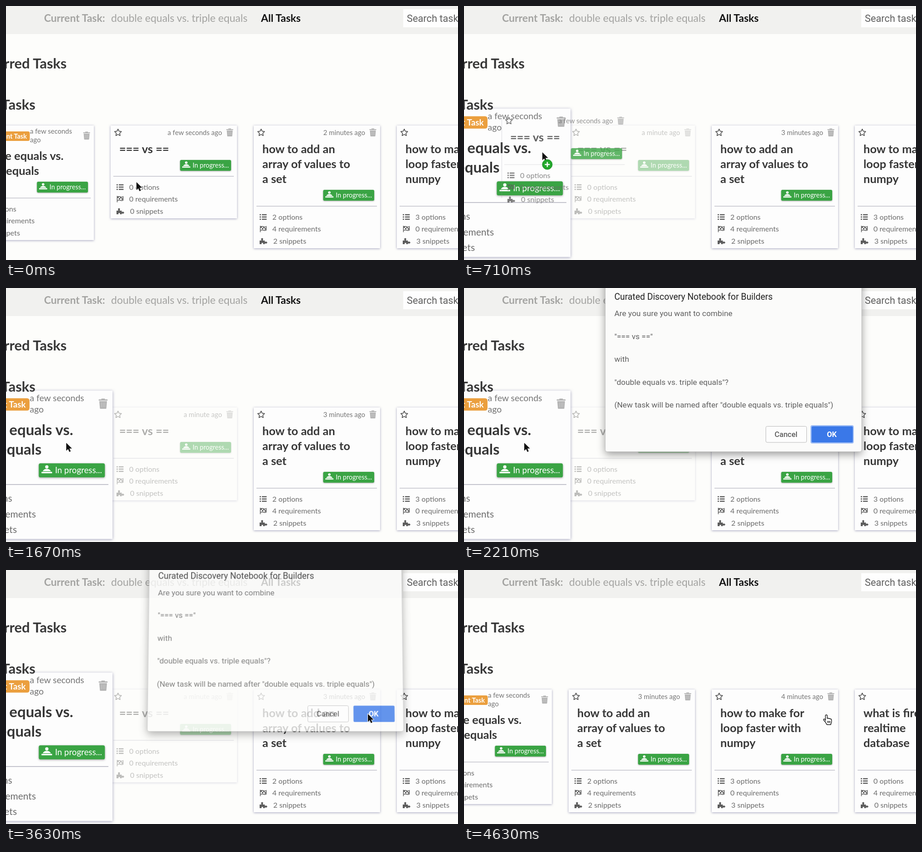
Recreate the animation shown at these times as an HTML page. Size 998 by 561 pixels, loop 4670 ms.

```html
<!DOCTYPE html>
<html lang="en">
<head>
<meta charset="utf-8">
<title>Combining tasks</title>
<style>
html, body { margin: 0; width: 100%; height: 100%; overflow: hidden; background: #fdfdfb; }
#stage { position: absolute; inset: 0; overflow: clip; contain: strict; }
svg { position: absolute; left: 0; top: 0; width: 998px; height: 561px; overflow: hidden; font-family: Lato, sans-serif; }
text { white-space: pre; }
.end { text-anchor: end; }
.mid { text-anchor: middle; }
.nav { font-size: 23px; fill: #a3a3a1; }
.bold { font-weight: 700; }
.head { font-size: 31px; font-weight: 700; fill: #373737; }
.title { font-size: 25.5px; font-weight: 700; fill: #363636; }
.date { font-size: 15px; fill: #757575; }
.row { font-size: 16.2px; fill: #6c6c6c; }
.tag { font-size: 14.5px; fill: #fff; }
.paper { fill: #fdfdfd; filter: drop-shadow(0 1.5px 2.5px rgba(70, 70, 125, .5)); }
.badge { fill: #3aa444; filter: drop-shadow(0 1px 1.5px rgba(0, 0, 0, .35)); }
.icon { fill: #5c5c5c; }
.line { fill: none; stroke: #5c5c5c; }

/* one clock for every part */
.anim { animation: 4670ms step-end infinite both; }
.before { animation-name: before; }
.after { animation-name: after; }
.old { animation-name: old; }
.new { animation-name: new; }
.source { animation-name: source; }
.ghost { animation-name: ghost; }
.plus { animation-name: plus; }
.arrow { animation-name: arrow; }
.hand { animation-name: hand; }
.grow { animation-name: grow; animation-timing-function: ease-out; transform-origin: 139.5px 126.5px; }
.mover { animation-name: move; animation-timing-function: linear; }
#dialog { animation-name: dialog; animation-timing-function: linear; transform-origin: 595px 361px; font-family: Roboto, sans-serif; }
.ring { animation-name: ring; }

@keyframes before { 0% { opacity: 1 } 6.42%, to { opacity: 0 } }
@keyframes after { 0% { opacity: 0 } 6.42%, to { opacity: 1 } }
@keyframes old { 0% { opacity: 1 } 82.4%, to { opacity: 0 } }
@keyframes new { 0% { opacity: 0 } 82.4%, to { opacity: 1 } }
@keyframes source { 0% { opacity: 1 } 6.42% { opacity: .4 } 82.4%, to { opacity: 0 } }
@keyframes ghost { 0% { opacity: 0 } 6.42% { opacity: .8 } 35.1%, to { opacity: 0 } }
@keyframes plus { 0% { opacity: 0 } 12.4% { opacity: 1 } 35.1%, to { opacity: 0 } }
@keyframes arrow { 0% { opacity: 1 } 83.5%, to { opacity: 0 } }
@keyframes hand { 0% { opacity: 0 } 83.5%, to { opacity: 1 } }
@keyframes ring { 0% { opacity: 1 } 76.4%, to { opacity: 0 } }
@keyframes grow {
  0%, 12.2% { transform: scale(1) }
  14.8%, 78.2% { transform: scale(1.295) }
  81.2%, to { transform: scale(1) }
}
@keyframes move {
  0% { transform: translate(287px, 388px); animation-timing-function: ease-in-out }
  5.4% { transform: translate(320px, 348px) }
  6.42% { transform: translate(320px, 348px); animation-timing-function: ease-in }
  12.2% { transform: translate(196px, 325px); animation-timing-function: ease-out }
  15.2% { transform: translate(172px, 322px) }
  24.2% { transform: translate(140px, 337px); animation-timing-function: ease-out }
  28%, 49% { transform: translate(132px, 341px); animation-timing-function: ease-in-out }
  64.2%, to { transform: translate(798px, 317px) }
}
@keyframes dialog {
  0%, 36.6% { opacity: 0; transform: translateY(-15px) perspective(2000px) rotateX(15deg) scaleY(1.06) }
  39.8%, 76.4% { opacity: 1; transform: translateY(0) perspective(2000px) rotateX(0deg) scaleY(1) }
  77.73% { opacity: .8; transform: translateY(-5px) perspective(2000px) rotateX(5deg) scaleY(1.02) }
  80.7%, to { opacity: 0; transform: translateY(-15px) perspective(2000px) rotateX(15deg) scaleY(1.06) }
}
</style>
</head>
<body>
<div id="stage">
  <svg id="page" viewBox="0 0 998 561"></svg>
  <svg id="dialog" class="anim" viewBox="0 0 998 561"></svg>
  <svg id="top" viewBox="0 0 998 561"></svg>
</div>
<script>
const text = (x, y, s, cls) => `<text x="${x}" y="${y}" class="${cls}">${s}</text>`;
const group = (x, y, body, cls = '') =>
  `<g transform="translate(${x} ${y})"><g class="${cls}">${body}</g></g>`;
const rect = (x, y, w, h, more) => `<rect x="${x}" y="${y}" width="${w}" height="${h}" ${more}/>`;

const starPoints = Array.from({ length: 10 }, (_, i) => {
  const r = i % 2 ? 3.9 : 8, a = i * Math.PI / 5;
  return `${(r * Math.sin(a)).toFixed(1)},${(-r * Math.cos(a)).toFixed(1)}`;
}).join(' ');
const star = group(16.3, 15.8,
  `<polygon points="${starPoints}" fill="none" stroke="#444" stroke-width="1.5" stroke-linejoin="round"/>`);

const trash = y => group(263, y, `
  <path fill="#b3b3b3" d="M-7.5-7h15v2h-15zM-3-8.500h6v2h-6zM-6.500-4h13l-1 12q0 1-1 1h-9q-1 0-1-1z"/>
  <path fill="none" stroke="#ccc" d="M-3-2v8.500M0-2v8.500M3-2v8.500"/>`);

const icons = [
  '<path class="line" stroke-width="2.3" d="M0-5h3M5-5h10.500M0 0h3M5 0h10.500M0 5h3M5 5h10.500"/>',
  `<path class="line" stroke-width="1.5" d="M1.500-7v14M2-5q3.500-1.500 6.500 0t6-.5v8q-3 1.500-6 .3t-6.500 .3"/>
   <path class="icon" d="M2-5l3-.7v3l-3 .5zM8-5l3 .5v3l-3-.5zM5-2.500l3 .5v3l-3-.5zM11-1.500l3-.5v3l-3 .5z"/>`,
  `<path class="icon" d="M0-1h4q-2-5 1.500-5.500q3.500 .5 1.500 5.500h4.500v3q4-2 5.500 1.500q-1.500 3.500-5.500 1.500v2h-4
   q1-3-1.500-3t-1.500 3h-4.500z"/>`
];

const badge = y => group(153, y, rect(.3, 0, 112.7, 24, 'rx="3" class="badge"') + `
  <g fill="#fff"><circle cx="14" cy="6" r="2.8"/>
  <path d="M7 13.500q2-4 7-4t7 4zM5 14.500h18v2.500h-18z"/></g>` +
  text(28, 17, 'In progress...', 'tag'));

const date = (s, cls = '') => text(246, 21, s, `date end ${cls}`);
const dates = (a, b) => date(a, 'anim before') + date(b, 'anim after');

const currentTop =
  rect(40, 13, 97.5, 21, 'rx="4" fill="#eb9f3e"') +
  text(131, 28.5, 'Current Task', 'tag bold end') +
  text(138, 18, 'a few seconds', 'date') + text(138, 37, 'ago', 'date') + trash(22);

function card(x, title, counts, top, { cls = '', first = 61, bare = false } = {}) {
  const b = first + (title.length - 1) * 33 + 15;
  const names = ['options', 'requirements', 'snippets'];
  const back = bare
    ? `<path d="M.5 10v${b + 100}" stroke="#889" opacity=".35"/>`
    : rect(0, 0, 279, b + 129, 'class="paper"');
  const rows = counts.map((n, i) => {
    const y = b + 60 + i * 26.5;
    return group(13, y, icons[i]) + text(i < 2 ? 41 : 43, y + 5.7, `${n} ${names[i]}`, 'row');
  }).join('');
  return group(x, 264, back + top +
    title.map((s, i) => text(19, first + i * 33, s, 'title')).join('') +
    badge(b) + rect(6, b + 35.5, 266, 1.3, `fill="#b9b9c4" opacity="${bare ? .4 : 1}"`) + rows, cls);
}

const plain = d => star + d + trash(15);
const addArray = ['how to add an', 'array of values to', 'a set'];
const fastLoop = ['how to make for', 'loop faster with', 'numpy'];
const compare = ['=== vs =='];
const hidden = { cls: 'anim old' }, shown = { cls: 'anim new' };

document.getElementById('page').innerHTML =
  rect(0, 0, 998, 62, 'fill="#f1f1ef"') +
  text(84, 34.5, 'Current Task:', 'nav bold') +
  text(232, 34.5, 'double equals vs. triple equals', 'nav') +
  '<text x="563" y="34.5" class="bold" font-size="23" fill="#111">All Tasks</text>' +
  rect(877, 7, 121, 40, 'fill="#fefefe"') +
  '<text x="885" y="34.5" font-size="21.8" fill="#606060" font-family="Roboto, sans-serif">Search task</text>' +
  card(231, compare, [0, 0, 0], plain(dates('a few seconds ago', 'a minute ago')), { cls: 'anim source' }) +
  card(547, addArray, [2, 4, 2], plain(dates('2 minutes ago', '3 minutes ago')), hidden) +
  card(863, fastLoop, [3, 0, 3], plain(''), hidden) +
  card(231, addArray, [2, 4, 2], plain(date('3 minutes ago')), shown) +
  card(547, fastLoop, [3, 0, 3], plain(date('4 minutes ago')), shown) +
  card(863, ['what is fire', 'realtime', 'database'], [0, 4, 0], plain(''), shown) +
  card(-85, ['double equals vs.', 'triple equals'], [0, 0, 0], currentTop, { cls: 'anim grow', first: 76 }) +
  text(134, 138, 'Starred Tasks', 'head end') +
  text(65, 229, 'Tasks', 'head end');

const message = ['Are you sure you want to combine', '"=== vs =="', 'with',
  '"double equals vs. triple equals"?', '(New task will be named after "double equals vs. triple equals")'];

document.getElementById('dialog').innerHTML =
  rect(312, -40, 566, 401.5, `rx="4" fill="#fbfbfa" stroke="#bbb" stroke-width=".8"
    style="filter:drop-shadow(0 6px 9px rgba(0,0,0,.38))"`) +
  '<text x="332" y="25.5" font-size="19.4" fill="#222">Curated Discovery Notebook for Builders</text>' +
  `<g font-size="17.37" fill="#606060">${message.map((s, i) => text(332, 62 + i * 50.5, s, '')).join('')}</g>` +
  rect(666.5, 305.5, 90, 35.5, 'rx="3" fill="#fdfdfd" stroke="#b8b8b8"') +
  rect(765, 303, 95.5, 40.5, 'rx="4" fill="#9dbcf5" class="anim ring"') +
  rect(767.5, 305.5, 91, 35.5, 'rx="2.5" fill="#3a78e8"') +
  `<g font-size="16.4"><g fill="#5c5c5c" font-weight="500">${text(711, 329, 'Cancel', 'mid')}</g>
   <g fill="#fff" font-weight="700">${text(812, 329, 'OK', 'mid')}</g></g>`;

// the dragged copy travels with the pointer
const ghost = group(-320, -348,
  card(231, compare, [0, 0, 0], plain(date('a few seconds ago')), { bare: true }), 'anim ghost');

document.getElementById('top').innerHTML = `<g class="anim mover">${ghost}
  <g class="anim arrow"><path d="M1 1v17.500l4-3.700 2.800 6.300 3.100-1.400-2.800-6.100h5.600z"
    fill="#111" stroke="#fff" stroke-width="2" stroke-linejoin="round" paint-order="stroke"/></g>
  <g class="anim plus"><circle cx="12" cy="28" r="11" fill="#22a82c" stroke="#158a1e"/>
    <path d="M6.500 28h11M12 22.500v11" stroke="#fff" stroke-width="2.6"/></g>
  <g class="anim hand" stroke="#111" stroke-width="1.4" stroke-linejoin="round">
    <path fill="#fff" d="M0 16V5q0-2 2-2t2 2v6q2-1.500 3.500.3q2-1 3.300.7q2.700-.5 2.700 2.500v4q0 2-1.500 4v2h-9v-1
      q-2-2-3-4.500l-3.500-4q-1.500-2 .2-2.800q1.500-.5 3.300 1.800z"/>
    <path fill="none" d="M5 16.500v4M7.500 16.500v4M10 16.500v4"/></g>
</g>`;
</script>
</body>
</html>
```
